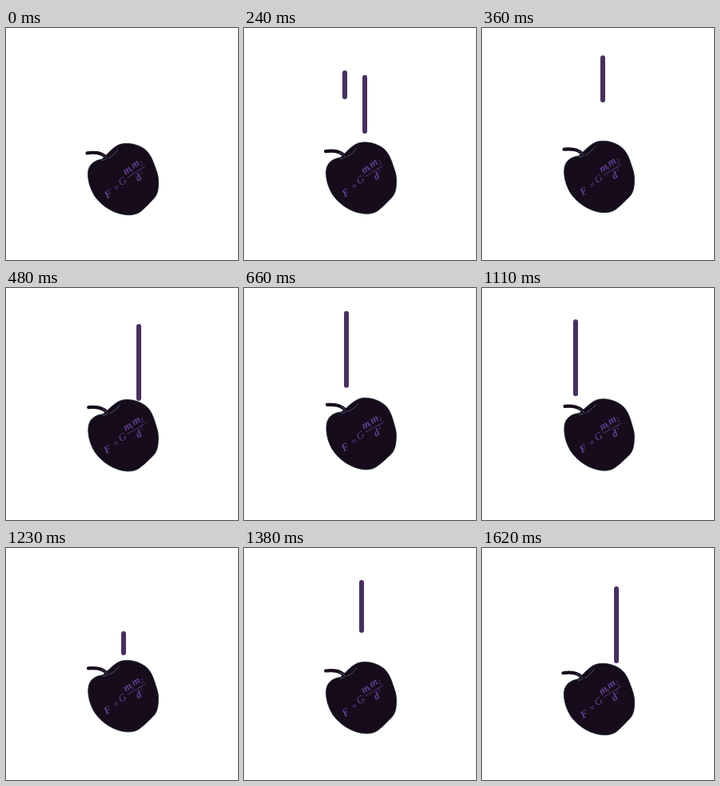
An HTML page that plays this animation: 290x290 px, repeating every 1650 ms.

```html
<!DOCTYPE html>
<html lang="en">
<head>
<meta charset="utf-8">
<title>Falling apple</title>
<style>
  html, body { margin: 0; width: 100%; height: 100%; overflow: hidden; background: #fff; }
  svg { display: block; width: 100vw; height: 100vh; }
  text {
    font-family: "Liberation Serif", "Noto Serif", serif;
    font-style: italic;
    text-anchor: middle;
    fill: #664091;
  }
  .bold { font-weight: bold; }
</style>
</head>
<body>
<svg viewBox="0 0 290 290">
  <g id="streaks" stroke="#47305e" stroke-width="6" stroke-linecap="round"></g>
  <g id="apple" fill="none" stroke-linecap="round">
    <path fill="#160c1b" stroke="#15262c" stroke-width=".8" d="M120 164C126 159 134 148 143 145.300C154 142.500 166 146 174 152
      C181 158 184 167 186.500 174C189 181 190.700 185 190.500 193C190.700 203 189 209 184 214
      C179 219 176 223 171 227C166 232 160 234 152 233.700C137 233 121 224 111.500 211
      C105 201 102 190 102.500 181C103 172 109 165.500 120 164Z"/>
    <path stroke="#536078" stroke-width=".9" d="M120 165.500C129 164 135 159 140 152"/>
    <path stroke="#160c1b" stroke-width="4.200" d="M101.500 156.300C110 155.200 119 155 126 162.500"/>
    <path stroke="#536078" stroke-width=".8" d="M119 157.500Q124 159 126.500 163.500"/>
    <path stroke="#664091" stroke-width=".8" d="M152 187L173.500 173"/>
    <g id="formula"></g>
  </g>
</svg>
<script>
const LOOP = 1650, STEP = 30;
const LENGTH = 96, GROW = 80, HOLD = 70;
const SVG = "http://www.w3.org/2000/svg";
const apple = document.getElementById("apple");

function add(parent, tag, attrs, label = "") {
  const node = document.createElementNS(SVG, tag);
  for (const key in attrs) node.setAttribute(key, attrs[key]);
  node.textContent = label;
  return document.getElementById(parent).appendChild(node);
}

// glyph, centre x, centre y, size, weight class
[
  ["F", 127.5, 207.5, 13, "bold"], ["=", 138, 199.5, 11, "bold"], ["G", 145.5, 191.5, 13, ""],
  ["m", 152, 178.5, 13, "bold"], ["1", 157.5, 178, 7, ""],
  ["m", 162, 171, 13, "bold"], ["2", 169, 169, 8, ""],
  ["d", 165.5, 186.5, 13, "bold"], ["2", 168.5, 179, 7, ""]
].forEach(([glyph, x, y, size, weight]) => add("formula", "text", {
  class: weight,
  "font-size": size,
  y: size * (glyph === "m" ? 0.23 : 0.33),
  transform: `translate(${x} ${y}) rotate(-35)`
}, glyph));

// birth time, x, resting top
const streaks = [
  [40, 126, 54.5], [179, 151, 37.5], [365, 166, 50],
  [570, 128, 36], [755, 140, 40], [985, 117, 45],
  [1205, 147, 42], [1385, 126, 36], [1510, 168, 48]
].map(([birth, x, top]) => ({ birth, top, line: add("streaks", "line", { x1: x, x2: x }) }));

const clamp = v => Math.min(1, Math.max(0, v));

function draw(t) {
  const swing = (1 - Math.cos(2 * Math.PI * t / LOOP)) / 2;
  const lift = -8 * swing;
  apple.setAttribute("transform", `translate(0 ${lift}) rotate(${4.5 * swing} 147 190)`);

  for (const { birth, top, line } of streaks) {
    const age = t - birth;
    const head = clamp(age / GROW);
    const tail = clamp((age - GROW - HOLD) / GROW);
    const bottom = top + lift + LENGTH;
    const y1 = bottom - LENGTH * head + 3;
    line.setAttribute("y1", y1);
    line.setAttribute("y2", Math.max(y1, bottom - LENGTH * tail - 3));
    line.setAttribute("visibility", head > 0 && tail < 1 ? "visible" : "hidden");
  }
}

const start = performance.now();
function tick() {
  const t = (performance.now() - start) % LOOP;
  draw(Math.floor(t / STEP) * STEP);
  requestAnimationFrame(tick);
}
tick();
</script>
</body>
</html>
```
